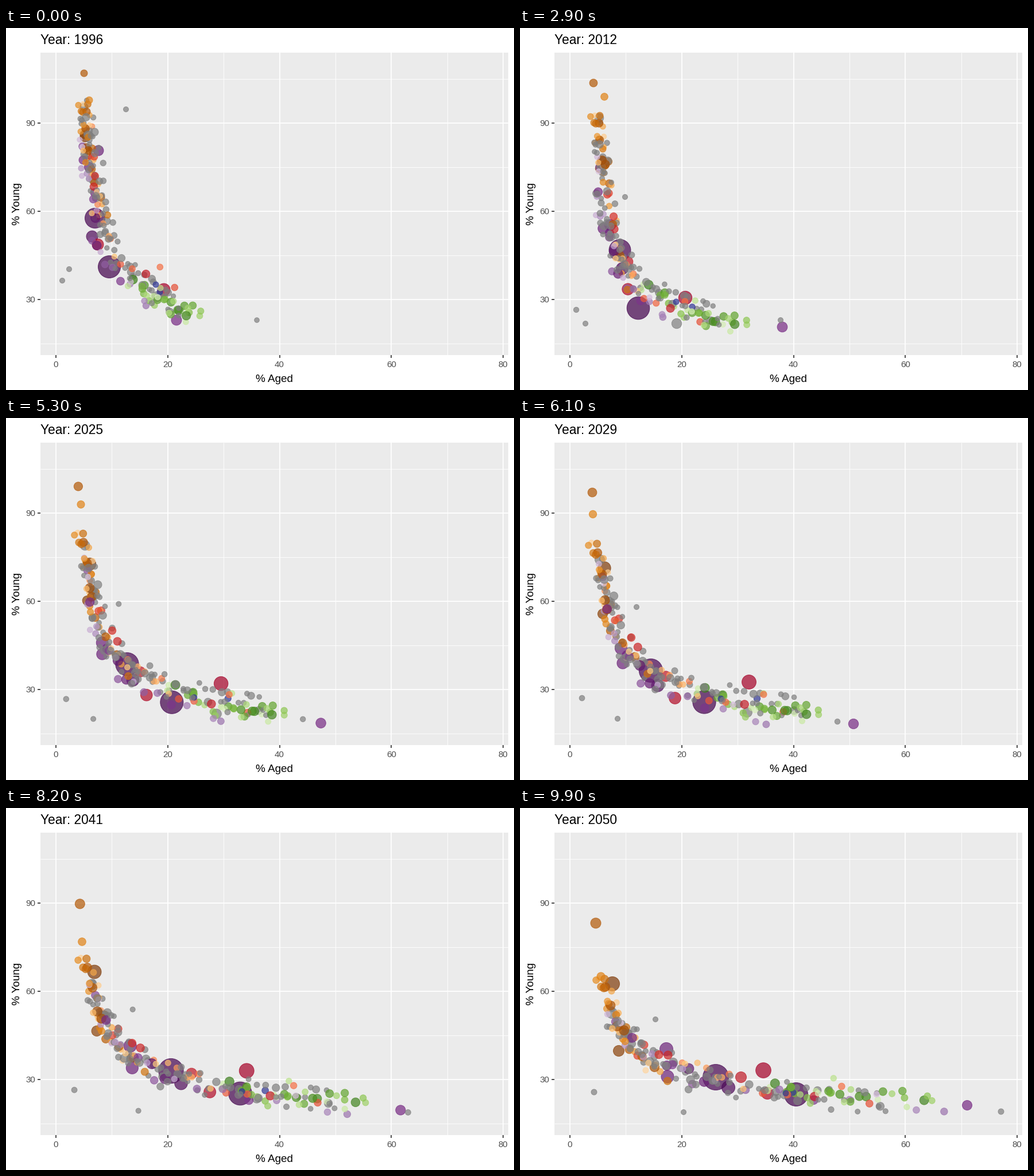
A matplotlib script that plays this animation: 885x632 px, repeating every 10 s.

```python
import numpy as np
import matplotlib.pyplot as plt
from matplotlib.animation import FuncAnimation
from matplotlib.colors import LinearSegmentedColormap, to_rgba

W, H, DPI = 885, 632, 100
FRAMES, STEP = 100, 100
PT = 72 / DPI  # points per pixel
KEYS = np.array([0, 29, 61, 99])
L, R, T, B = 60, 875, 43, 571  # panel
TICK = "#4d4d4d"

AFRICA = ["#7f3b08", "#b35806", "#e08214", "#fdb863", "#fee0b6"]
AMERICA = ["#a50026", "#d73027", "#f46d43", "#fdae61", "#fee090"]
ASIA = ["#40004b", "#762a83", "#9970ab", "#c2a5cf", "#e7d4e8"]
EUROPE = ["#276419", "#4d9221", "#7fbc41", "#b8e186", "#e6f5d0"]
OCEANIA = ["#313695", "#4575b4"]
GREY = ["#7f7f7f", "#7f7f7f"]

plt.rcParams["font.family"] = "Liberation Sans"
rng = np.random.default_rng(7)
paths, radii, colours = [], [], []


def glide(vals):
    """Smooth path through values at KEYS, sampled at every frame."""
    t = np.arange(FRAMES)
    slope = np.gradient(vals, KEYS, axis=0)
    i = np.clip(np.searchsorted(KEYS, t, side="right") - 1, 0, len(KEYS) - 2)
    h = (KEYS[i + 1] - KEYS[i])[:, None]
    u = (t - KEYS[i])[:, None] / h
    a, b = vals[i], vals[i + 1]
    return (a * (1 + 2 * u) * (1 - u) ** 2 + b * u * u * (3 - 2 * u)
            + h * slope[i] * u * (1 - u) ** 2 + h * slope[i + 1] * u * u * (u - 1))


def add(shades, shade, r0, r1, pts):
    ramp = LinearSegmentedColormap.from_list("ramp", shades)
    paths.append(glide(np.array(pts, float)))
    radii.append(np.linspace(r0, r1, FRAMES))
    colours.append(to_rgba(ramp(shade), 0.7))


def crowd(shades, n, r_max, r_min, grow, spread, band):
    """n dots strung along a band whose bend is given at each key time.

    Larger dots are darker; each keeps its own rank and offset."""
    band = np.array(band, float)
    stops = np.linspace(0, 1, band.shape[1])
    for q, s in zip(np.linspace(0, 1, n), rng.permutation(n) / n):
        spot = [[np.interp(q, stops, row[:, k]) for k in (0, 1)] for row in band]
        r = r_min + (r_max - r_min) * (1 - s) ** 2
        add(shades, 0.15 + 0.8 * s, grow * r, r, spot + rng.normal(0, spread))


# the dots large or lonely enough to follow by eye
add(ASIA, 0, 19.5, 20.5, [(180, 417), (206, 489), (321, 496), (481, 500)])
add(ASIA, 0.02, 17.5, 22.5, [(155, 332), (174, 388), (228, 441), (341, 470)])
add(AMERICA, 0, 11, 13.3, [(275, 457), (288, 471), (399, 461), (424, 458)])
add(ASIA, 0.06, 10, 11.5, [(150, 364), (178, 420), (240, 467), (363, 488)])
add(ASIA, 0.2, 9, 11.5, [(161, 214), (157, 344), (176, 402), (255, 421)])
add(ASIA, 0.2, 8.5, 11, [(145, 243), (145, 350), (179, 428), (257, 469)])
add(ASIA, 0.25, 9, 8.5, [(297, 510), (457, 522), (581, 534), (779, 519)])
add(AMERICA, 0.06, 10, 10.5, [(160, 378), (188, 456), (270, 489), (431, 498)])
add(AMERICA, 0.14, 8.5, 9.5, [(158, 326), (188, 408), (254, 451), (385, 470)])
add(AFRICA, 0, 9, 12.5, [(138, 190), (144, 235), (147, 262), (161, 307)])
add(AFRICA, 0.06, 7, 9.5, [(136, 186), (139, 245), (144, 342), (172, 424)])
add(AFRICA, 0.25, 6, 9, [(136, 79), (128, 96), (126, 130), (132, 201)])
add(GREY, 0, 7, 9.5, [(136, 138), (138, 157), (139, 247), (160, 358)])
add(GREY, 0, 9, 8, [(263, 469), (273, 516), (396, 514), (461, 500)])
giants = len(paths)
add(AFRICA, 0.5, 6, 7, [(145, 126), (147, 120), (127, 168), (141, 294)])
add(GREY, 0, 4.3, 5, [(437, 510), (454, 510), (553, 530), (838, 530)])
add(GREY, 0, 4.5, 5, [(98, 441), (98, 492), (108, 489), (129, 496)])
add(GREY, 0, 4.5, 4.5, [(110, 421), (114, 516), (170, 525), (285, 531)])
add(GREY, 0, 4.5, 4.5, [(209, 142), (183, 295), (203, 330), (236, 369)])
add(OCEANIA, 0, 5, 6, [(268, 461), (300, 487), (413, 490), (475, 496)])
add(OCEANIA, 1, 5, 5, [(261, 448), (272, 478), (350, 490), (463, 498)])

crowd(AFRICA, 34, 8.5, 5, 0.86, (6, 10), [
    [(142, 130), (137, 185), (144, 235), (170, 320)],
    [(138, 150), (138, 205), (150, 260), (180, 450)],
    [(132, 215), (145, 285), (152, 360), (215, 440)],
    [(145, 295), (160, 355), (185, 410), (250, 470)]])
crowd(AMERICA, 18, 7.5, 5, 0.92, (7, 9), [
    [(152, 180), (155, 320), (185, 390), (285, 440)],
    [(150, 240), (172, 400), (200, 450), (305, 500)],
    [(150, 310), (230, 440), (300, 480), (450, 500)],
    [(185, 405), (290, 445), (370, 485), (600, 503)]])
crowd(ASIA, 22, 9, 5, 0.9, (8, 9), [
    [(131, 200), (146, 270), (165, 395), (245, 480)],
    [(137, 230), (145, 345), (180, 440), (250, 500)],
    [(140, 260), (170, 405), (240, 470), (430, 530)],
    [(155, 365), (235, 445), (340, 480), (740, 525)]])
crowd(EUROPE, 31, 8, 5, 0.97, (8, 9), [
    [(220, 450), (265, 470), (298, 492), (335, 500)],
    [(215, 455), (300, 495), (335, 512), (395, 515)],
    [(310, 480), (410, 510), (460, 510), (520, 515)],
    [(435, 495), (520, 498), (590, 503), (725, 508)]])
crowd(GREY, 82, 7.5, 4.4, 0.93, (8, 11), [
    [(138, 140), (155, 260), (190, 400), (308, 490)],
    [(138, 180), (150, 340), (205, 445), (355, 505)],
    [(140, 260), (185, 415), (300, 475), (500, 505)],
    [(158, 365), (230, 437), (370, 488), (650, 515)]])

order = np.r_[:giants, giants + rng.permutation(len(paths) - giants)]
paths = np.array(paths)[order]
sizes = (2 * np.array(radii)[order] * PT) ** 2
colours = np.array(colours)[order]


def px(aged):
    return 87 + 9.7375 * aged


def py(young):
    return 627.5 - 5.1333 * young


fig = plt.figure(figsize=(W / DPI, H / DPI), dpi=DPI, facecolor="white")
ax = fig.add_axes([0, 0, 1, 1])
ax.set(xlim=(0, W), ylim=(H, 0))
ax.axis("off")
ax.add_patch(plt.Rectangle((L, T), R - L, B - T, fc="#ebebeb", lw=0, zorder=0))


def line(xs, ys, colour="white", width=1.7):
    ax.plot(xs, ys, color=colour, lw=width * PT, solid_capstyle="butt", zorder=1)


def label(x, y, text, size, colour="black", **kw):
    return ax.text(x, y, text, fontsize=size * PT, color=colour,
                   **{"va": "baseline", "ha": "center", **kw})


for v in range(10, 80, 20):
    line([px(v)] * 2, [T, B], width=0.9)
for v in range(15, 110, 30):
    line([L, R], [py(v)] * 2, width=0.9)
for v in range(0, 81, 20):
    line([px(v)] * 2, [T, B])
    line([px(v)] * 2, [B, B + 4.6], "#333333")
    label(px(v), 592, str(v), 15, TICK)
for v in (30, 60, 90):
    line([L, R], [py(v)] * 2)
    line([L - 4.6, L], [py(v)] * 2, "#333333")
    label(51, py(v) + 5.5, str(v), 15, TICK, ha="right")

label(467, 618, "% Aged", 18.9)
label(19, 307, "% Young", 18.9, rotation=90, va="center")
title = label(L, 28, "Year: 1996", 22.8, ha="left")

dots = ax.scatter(*paths[:, 0].T, s=sizes[:, 0], c=colours,
                  edgecolors=colours, linewidths=PT, zorder=2)


def draw(i):
    dots.set_offsets(paths[:, i])
    dots.set_sizes(sizes[:, i])
    title.set_text(f"Year: {1996 + 54 * i / (FRAMES - 1):.0f}")
    return dots, title


anim = FuncAnimation(fig, draw, frames=FRAMES, interval=STEP,
                     repeat=True, repeat_delay=0)
plt.show()
```
